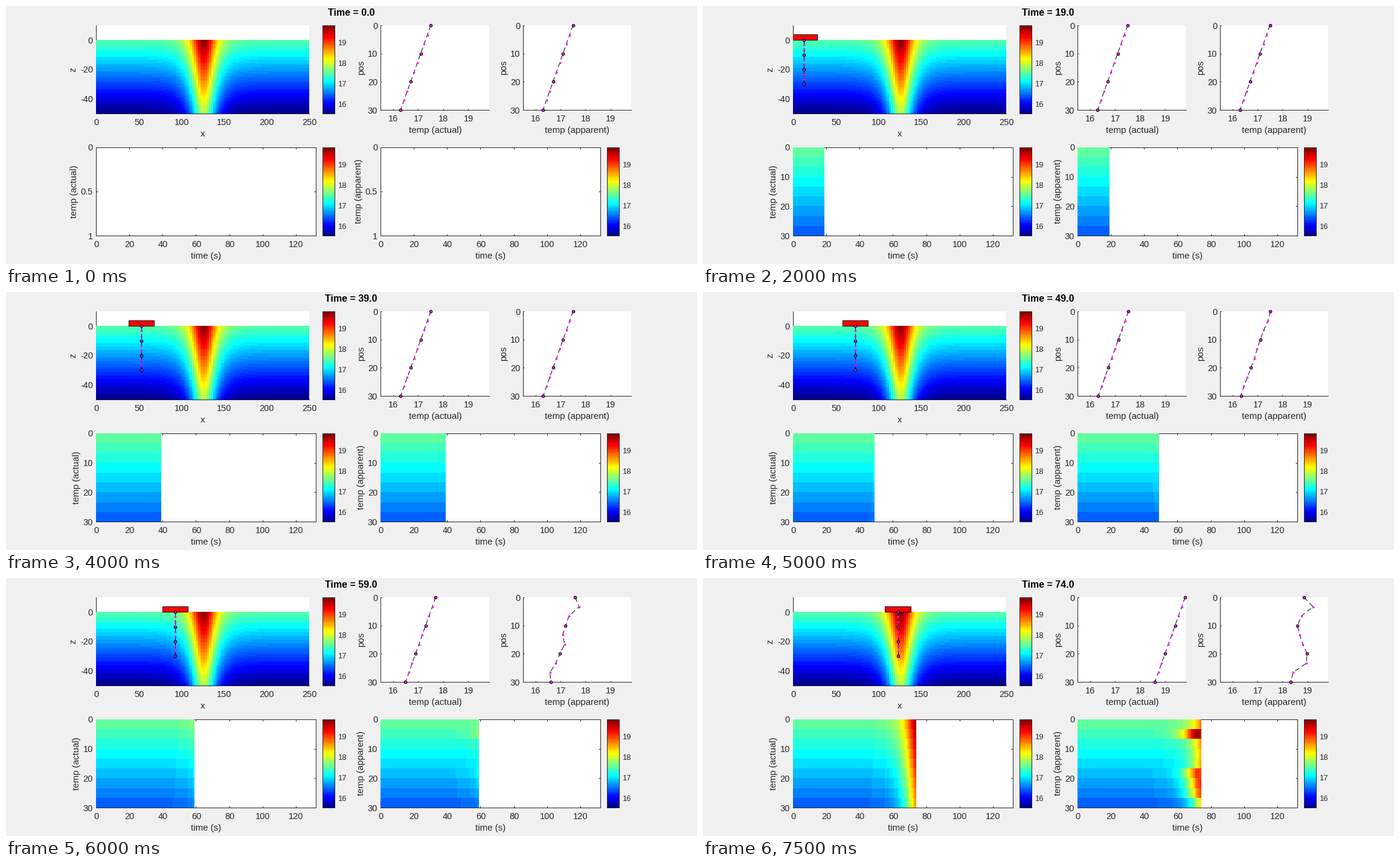
These frames come from a looping animation (1144 px wide and 427 px high, 8000 ms). A matplotlib script:

```python
import numpy as np
import matplotlib
import matplotlib.pyplot as plt
from matplotlib.animation import FuncAnimation
from matplotlib.colors import ListedColormap
from matplotlib.patches import Rectangle

matplotlib.rcParams["font.family"] = "Liberation Sans"

W, H, DPI = 1144, 427, 64
PX = 72 / DPI                     # points per pixel
INK = "#262626"
LOW, HIGH = 15.5, 19.83           # temperature range
AMP, CENTER, SPREAD = 2.33, 125, 10.1
DEPTHS = np.linspace(0, 30, 10)
T_END = 132

# Sensor response: slow sensors smooth, fast ones anticipate the signal
LAG = {0: 1.19, 2: 0.92, 3: 0.95, 4: 0.65, 8: 0.35}
LEAD = {1: (0.60, 0.33), 5: (0.46, 0.24), 6: (0.34, 0.07),
        7: (0.24, 0.0), 9: (0.38, 0.20)}


def jet64():
    i = np.arange(1, 65) / 16
    return ListedColormap(np.stack(
        [np.clip(1.5 - np.abs(i - c), 0, 1) for c in (3, 2, 1)], axis=1))


def sech(p):
    return 1 / np.cosh(p)


def boat_x(t):
    return 2 * t - 25


def background(depth):
    return 17.5 - 0.04 * depth


def lagged(p, tau):
    u = np.linspace(0, 10, 500) * tau
    w = np.exp(-u / tau)
    return sech(p[:, None] - u) @ (w / w.sum())


def leading(p, a, b):
    s = sech(p)
    return s * (1 - a * np.tanh(p) + b * (1 - 2 * s * s))


times = np.arange(T_END)
phase = (boat_x(times) - CENTER) / SPREAD
actual = background(DEPTHS)[:, None] + AMP * sech(phase)
apparent = background(DEPTHS)[:, None] + AMP * np.array(
    [lagged(phase, LAG[k]) if k in LAG else leading(phase, *LEAD[k])
     for k in range(10)])

fig = plt.figure(figsize=(W / DPI, H / DPI), dpi=DPI, facecolor="#f0f0f0")
image_style = dict(cmap=jet64(), vmin=LOW, vmax=HIGH, aspect="auto",
                   interpolation="nearest", zorder=3)


def put(x, y, s, size=14.5, color=INK, **kw):
    kw.setdefault("ha", "center")
    kw.setdefault("va", "baseline")
    return fig.text(x / W, 1 - y / H, s, fontsize=size * PX, color=color, **kw)


def side_label(x, y, s):
    return put(x, y, s, 15, rotation=90, va="center")


def make_axes(x0, y0, x1, y1, xlim, ylim, box=True):
    ax = fig.add_axes([x0 / W, 1 - y1 / H, (x1 - x0) / W, (y1 - y0) / H])
    ax.set(xlim=xlim, ylim=ylim, xticks=[], yticks=[])
    for name, spine in ax.spines.items():
        spine.set(linewidth=PX, color=INK)
        spine.set_visible(box or name in ("left", "bottom"))
    ax.tick_params(direction="in", length=3 * PX, width=PX, color=INK,
                   labelbottom=False, labelleft=False, top=box, right=box)
    return ax


def x_numbers(x0, x1, lim, values, y):
    for v in values:
        put(x0 + (v - lim[0]) / (lim[1] - lim[0]) * (x1 - x0) + 0.5, y, str(v))


def y_numbers(x, y0, y1, lim, values, **kw):
    """Labels beside a vertical axis; lim runs from bottom to top."""
    return [put(x, y1 - (v - lim[0]) / (lim[1] - lim[0]) * (y1 - y0) + 5.5,
                f"{v:g}", **kw) for v in values]


def colorbar(x0, y0):
    ax = make_axes(x0, y0, x0 + 20, y0 + 146, (0, 1), (LOW, HIGH))
    ax.imshow(np.linspace(LOW, HIGH, 64)[:, None], origin="lower",
              extent=(0, 1, LOW, HIGH), **{**image_style, "zorder": 1})
    y_numbers(x0 + 25, y0, y0 + 146, (LOW, HIGH), (16, 17, 18, 19),
              size=13, ha="left")


def sensor_string(ax, x, y, clip):
    """Dashed line, small dots on every sensor, rings on every third."""
    line, = ax.plot(x, y, color="k", lw=PX, dashes=(8, 5), zorder=6,
                    clip_on=clip)
    dots, = ax.plot(x, y, "o", color="#ff00ff", ms=3.6 * PX, mew=0, zorder=7,
                    clip_on=clip)
    rings, = ax.plot(x[::3], y[::3], "o", mfc="#ff00ff", mec="k",
                     ms=4.6 * PX, mew=PX, zorder=8, clip_on=clip)
    return line, dots, rings


def move_string(parts, x):
    line, dots, rings = parts
    line.set_xdata(x)
    dots.set_xdata(x)
    rings.set_xdata(x[::3])


def section():
    ax = make_axes(149, 32, 502, 178, (0, 250), (-50, 10), box=False)
    x = np.arange(0, 250, 2.5)
    z = np.arange(-50, 0)
    field = background(-z)[:, None] + AMP * sech((x - CENTER) / SPREAD)
    ax.imshow(field, origin="lower", extent=(0, 250, -50, 0), **image_style)
    ax.set(xlim=(0, 250), ylim=(-50, 10))
    x_numbers(149, 502, (0, 250), range(0, 251, 50), 197)
    y_numbers(144, 32, 178, (-50, 10), (0, -20, -40), ha="right")
    put(326, 216, "x", 15)
    side_label(111, 105, "z")
    boat = ax.add_patch(Rectangle((0, 0), 30, 4, fc="#ff0000", ec="k",
                                  lw=PX, zorder=5))
    return boat, sensor_string(ax, np.zeros(10), -DEPTHS, True)


def profile(x0, x1, name):
    ax = make_axes(x0, 32, x1, 172, (LOW, HIGH), (30, 0), box=False)
    ax.set(xticks=range(16, 20), yticks=range(0, 31, 10))
    ax.tick_params(length=2 * PX)
    x_numbers(x0, x1, (LOW, HIGH), range(16, 20), 191)
    y_numbers(x0 - 5, 32, 172, (30, 0), range(0, 31, 10), ha="right")
    put((x0 + x1) / 2 + 0.5, 210, name, 15)
    side_label(x0 - 31.5, 102, "pos")
    return sensor_string(ax, background(DEPTHS), DEPTHS, False)


class History:
    """Growing time-depth map of one temperature record."""

    def __init__(self, x0, name, record):
        x1 = x0 + 364
        self.x0 = x0
        self.record = record[:-1]
        self.ax = make_axes(x0, 234, x1, 380, (0, T_END), (30, 0))
        self.image = self.ax.imshow(np.full((9, T_END), np.nan),
                                    extent=(0, T_END, 30, 0), **image_style)
        self.ax.set_xticks(range(0, 121, 20))
        x_numbers(x0, x1, (0, T_END), range(0, 121, 20), 399)
        put(x0 + 182, 418, "time (s)", 15)
        self.label = side_label(x0 - 32, 307, name)
        self.empty = y_numbers(x0 - 5, 234, 380, (1, 0), (0, 0.5, 1),
                               ha="right")
        self.filled = y_numbers(x0 - 5, 234, 380, (30, 0), range(0, 31, 10),
                                ha="right")

    def show(self, t):
        started = t > 0
        self.image.set_data(np.where(times < t, self.record, np.nan))
        self.ax.set_yticks([0, 10, 20, 30] if started else [0, 15, 30])
        self.label.set_x((self.x0 - (32 if started else 36)) / W)
        for text in self.empty:
            text.set_visible(not started)
        for text in self.filled:
            text.set_visible(started)


title = put(571.5, 16, "", 16, "k", weight="bold")
boat, chain = section()
profiles = [(profile(620, 800, "temp (actual)"), actual),
            (profile(856, 1035, "temp (apparent)"), apparent)]
histories = [History(149, "temp (actual)", actual),
             History(620, "temp (apparent)", apparent)]
for corner in ((524, 32), (524, 234), (995, 234)):
    colorbar(*corner)


def update(i):
    t = max(5 * i - 1, 0)
    title.set_text(f"Time = {t:.1f}")
    boat.set_x(boat_x(t) - 15)
    move_string(chain, np.full(10, boat_x(t)))
    for parts, record in profiles:
        move_string(parts, record[:, t])
    for history in histories:
        history.show(t)
    return []


anim = FuncAnimation(fig, update, frames=16, interval=500, repeat=True,
                     repeat_delay=0, init_func=lambda: update(0))
plt.show()
```
